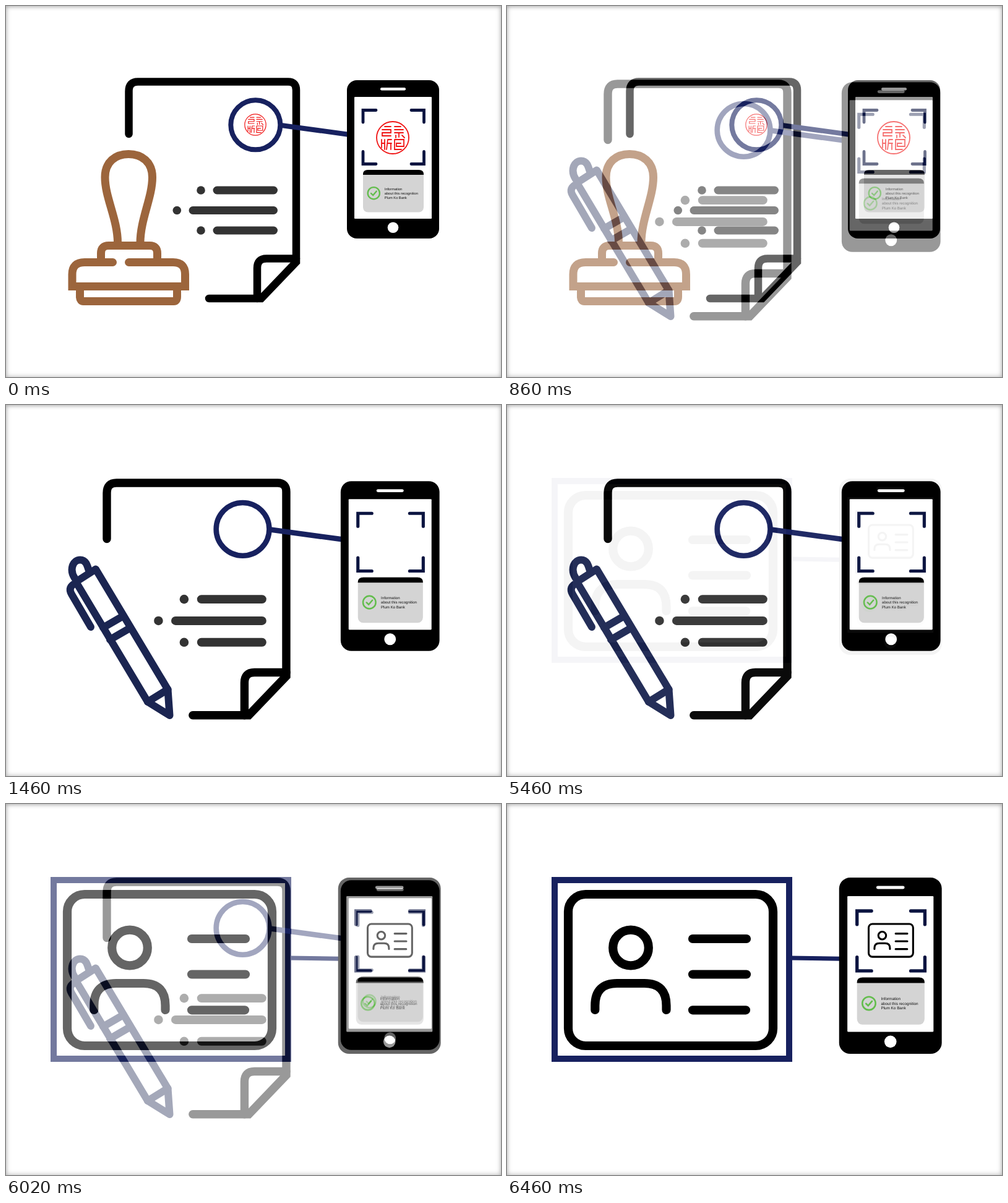
Recreate the animation shown at these times as an HTML page. Size 800x600 px, loop 8 s.

```html
<!DOCTYPE html>
<html lang="en">
<head>
<meta charset="utf-8">
<title>Document recognition</title>
<style>
  html, body { margin: 0; width: 100%; height: 100%; overflow: hidden; background: #fff; }
  svg { display: block; width: 800px; height: 600px; }
  .vignette {
    position: absolute; left: 0; top: 0; width: 800px; height: 600px;
    box-shadow: inset 0 0 8px rgba(0,0,0,.28), inset 0 2px 5px rgba(0,0,0,.12);
  }
  .line { fill: none; stroke-linecap: round; }
  .black { stroke: #000; }
  .navy { stroke: #17215f; }
  text { font: 5.7px "Liberation Sans", Arial, sans-serif; fill: #111; text-rendering: geometricPrecision; }
</style>
</head>
<body>
<svg viewBox="0 0 800 600">
  <defs>
    <g id="phone">
      <rect x="551" y="120" width="149" height="256" rx="16"/>
      <rect x="563" y="147" width="125" height="197" rx="1" fill="#fff"/>
      <rect x="605" y="132" width="41" height="4.5" rx="2.2" fill="#fff"/>
      <circle cx="625.5" cy="358.3" r="8.8" fill="#fff"/>
      <path class="line" stroke="#0b1440" stroke-width="4.8"
        d="M577 188V168.500H598M655 168.500H675.500V188M577 235.500V255.500H598M655 255.500H675.500V235.500"/>
      <rect x="577" y="265" width="98" height="68.500" rx="8" fill="#d4d4d4"/>
      <path d="M577 273V272Q577 265 585 265H667Q675 265 675 272V273Z"/>
      <g class="line" stroke="#62bd4c" stroke-width="2.3">
        <circle cx="594.300" cy="302.700" r="9.600"/>
        <path d="M590 303L593.200 306L598.800 299.500"/>
      </g>
      <text x="611.800" y="298.200">Information</text>
      <text x="611.800" y="304.900">about this recognition</text>
      <text x="611.800" y="311.700">Plum Ko Bank</text>
    </g>

    <g id="paper">
      <g class="line black" stroke-width="12.500">
        <path d="M198.500 207V138Q198.500 122.500 213 122.500H456Q469 122.500 469 136V414L412.500 473H328"/>
        <path d="M406 473V424Q406 408.500 421 408.500H469"/>
      </g>
      <path class="line" stroke="#333" stroke-width="13"
        d="M341 298H432.500M302 330.500H432.500M341 363H432.500"/>
      <g fill="#333">
        <circle cx="315" cy="298" r="6.800"/>
        <circle cx="276.300" cy="330.500" r="6.800"/>
        <circle cx="315" cy="363" r="6.800"/>
      </g>
      <g class="line navy" stroke-width="8">
        <circle cx="403.300" cy="192.300" r="40"/>
        <path stroke-linecap="butt" d="M445 193L553 207.700"/>
      </g>
      <use href="#phone"/>
    </g>

    <g id="seal" class="line" stroke="#f01414" stroke-width="1.800">
      <circle r="26"/>
      <path d="M-13-18H-3M-17-13H-3V-8H-17V-3H-3M3-18H13M3-13H17M3-8H17M10-8V-1M5-4V0M15-4L19 0
        M-18 3V16M-13 3V19M-18 9H-13M-8 3L-10 19M-8 3H-2M-8 9H-2M-3 9V19M3 3H18V14H6V9H13M3 3V19H14"/>
    </g>

    <g id="card" class="line black" stroke-width="14.200">
      <rect x="99" y="146" width="331" height="245" rx="28"/>
      <circle cx="200" cy="232.500" r="28.800"/>
      <path d="M142.300 333V326Q142.300 290 178 290H222Q257.500 290 257.500 326V333
        M300 218H387M300 275.500H387M300 333.300H386"/>
    </g>
  </defs>

  <g class="scene">
    <rect width="800" height="600" fill="#fff"/>
    <use href="#paper"/>
    <use href="#seal" transform="translate(403 192) scale(.66)"/>
    <use href="#seal" transform="translate(625 213)"/>
    <g class="line" stroke="#9c653c" stroke-width="13">
      <path d="M180.500 383C180.500 345 160 310 160 277C160 252 177 239.500 198 239.500
        S236.500 252 236.500 277C236.500 310 217 345 217 383"/>
      <path d="M153.500 410V400Q153.500 387.500 166 387.500H232Q244.500 387.500 244.500 400V410"/>
      <path d="M172.500 414.500H127Q107 414.500 107 434V453.500H289.500V434Q289.500 414.500 270 414.500H198.500"/>
      <path d="M119.500 455V471Q120 477.500 125 477.500H271Q276.500 477.500 276.500 470V455"/>
    </g>
  </g>

  <g class="scene" opacity="0">
    <rect width="800" height="600" fill="#fff"/>
    <use href="#paper" transform="translate(-49.800 -5.350) scale(1.072)"/>
    <g class="line" stroke="#1b2551" stroke-width="12" stroke-linejoin="round">
      <path d="M113 286L145 265.500L261.500 460L264.500 502L229 480Z"/>
      <path d="M157 360L189 341.500M168 379.500L200 361M229 480L261.500 460"/>
      <path d="M111 280C102 266 108 250.500 120 250.500C130 250.500 132 262 134 268"/>
      <path d="M113 288Q99 294 106 306L137 359"/>
    </g>
  </g>

  <g class="scene" opacity="0">
    <rect width="800" height="600" fill="#fff"/>
    <g class="line navy">
      <rect x="77" y="123" width="379" height="289" stroke-width="10"/>
      <path stroke-width="7" d="M458 249L540 250.300"/>
    </g>
    <use href="#card"/>
    <use href="#phone" transform="translate(-76.800 -14.600) scale(1.1135)"/>
    <use href="#card" transform="translate(563 162.300) scale(.217)"/>
  </g>
</svg>
<div class="vignette"></div>
<script>
  const LOOP = 8000, STEP = 40, STEPS = 25;
  const fadeStarts = [460, 5420];
  const scenes = document.querySelectorAll('.scene');
  const origin = performance.now();

  function draw() {
    const t = (performance.now() - origin) % LOOP;
    fadeStarts.forEach((start, i) => {
      const step = Math.floor((t - start) / STEP);
      scenes[i + 1].setAttribute('opacity', Math.min(1, Math.max(0, step / STEPS)));
    });
    requestAnimationFrame(draw);
  }
  draw();
</script>
</body>
</html>
```
